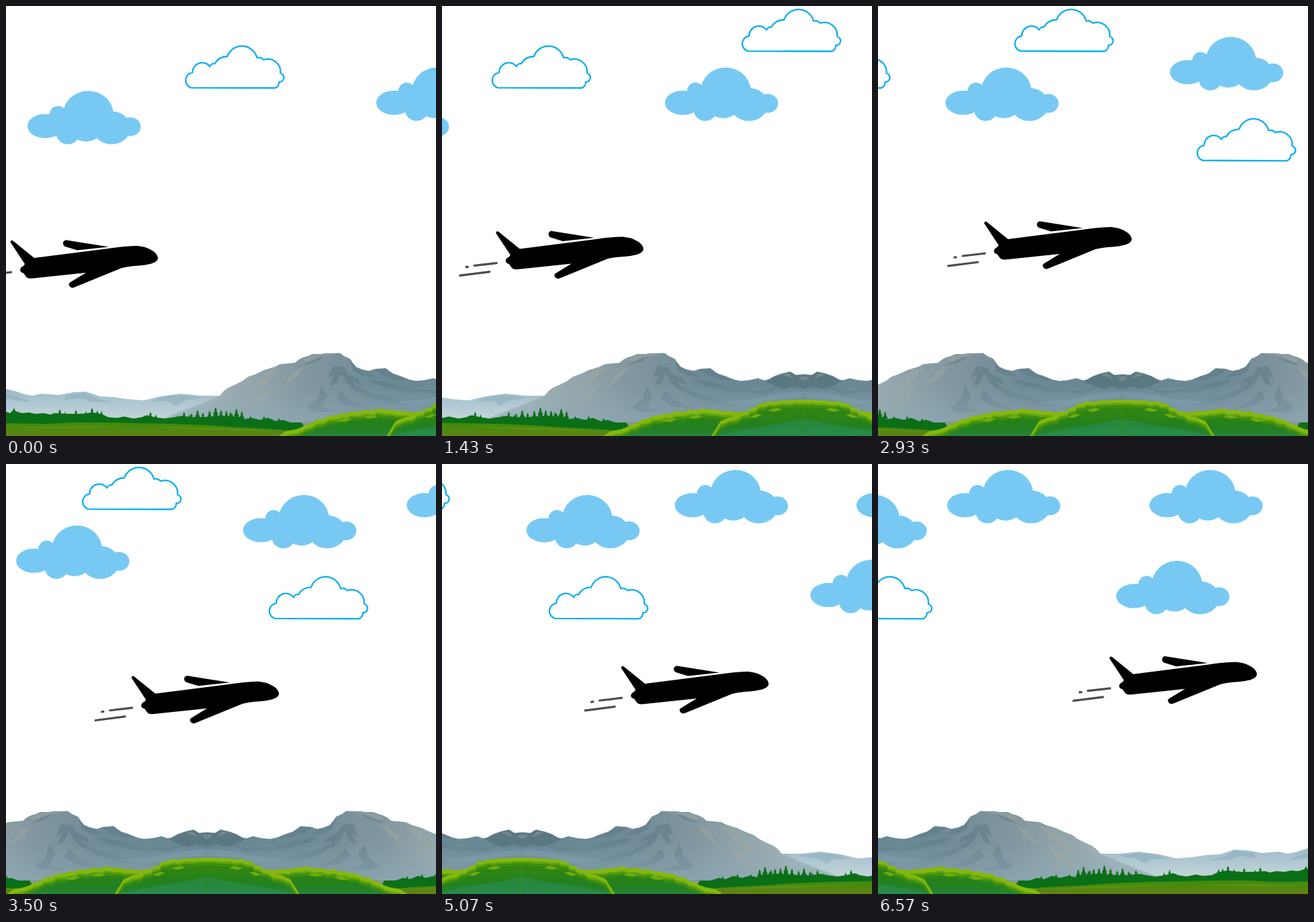
Write an HTML page without scripts that moves like this. It is 640 px wide and 640 px high and loops after 6640 ms.

```html
<!DOCTYPE html>
<html lang="en">
<head>
<meta charset="utf-8">
<title>Plane over the hills</title>
<style>
@property --k { syntax: "<integer>"; inherits: true; initial-value: 0; }
@property --u { syntax: "<integer>"; inherits: true; initial-value: 0; }

html, body { margin: 0; width: 100%; height: 100%; overflow: hidden; background: #fff; }

/* --k counts the 14 fps pictures, --u is the same moment in 25 fps units, rounded up */
body {
  --u: calc(var(--k) * 25 / 14 + .49);
  animation: clock 6640ms steps(93) -5ms infinite;
}
@keyframes clock { from { --k: 0; } to { --k: 93; } }

svg { display: block; width: 100%; height: 100%; }

/* --x, --y: start; --v, --w: speed to the left and down */
.move {
  --x: 0; --y: 0; --v: 0; --w: 0;
  transform: translate(
    calc((var(--x) - var(--u) * var(--v)) * 1px),
    calc((var(--y) + var(--u) * var(--w)) * 1px));
}
.land { --v: 4.6; }
.plane { --v: -2.048; --w: -.378; }
.rise { --w: .04; }
</style>
</head>
<body>
<svg viewBox="0 0 640 640" preserveAspectRatio="none">
  <defs>
    <linearGradient id="far" x1="0" y1="570" x2="0" y2="614" gradientUnits="userSpaceOnUse">
      <stop offset="0" stop-color="#9dbac7"/>
      <stop offset=".5" stop-color="#b0c8d2"/>
      <stop offset="1" stop-color="#c3d4d8"/>
    </linearGradient>
    <linearGradient id="rock" x1="230" y1="0" x2="704" y2="0" gradientUnits="userSpaceOnUse">
      <stop offset="0" stop-color="#b3c6cc"/>
      <stop offset=".22" stop-color="#9aacb0"/>
      <stop offset=".45" stop-color="#82979f"/>
      <stop offset=".7" stop-color="#6d8996"/>
      <stop offset="1" stop-color="#678693"/>
    </linearGradient>
    <linearGradient id="haze" x1="0" y1="560" x2="0" y2="618" gradientUnits="userSpaceOnUse">
      <stop offset="0" stop-color="#8fabb7" stop-opacity="0"/>
      <stop offset="1" stop-color="#8fabb7" stop-opacity=".6"/>
    </linearGradient>
    <linearGradient id="grass" x1="0" y1="618" x2="0" y2="640" gradientUnits="userSpaceOnUse">
      <stop offset="0" stop-color="#3f8a10"/>
      <stop offset=".5" stop-color="#4a8a0e"/>
      <stop offset="1" stop-color="#648016"/>
    </linearGradient>
    <linearGradient id="hill" x1="0" y1="592" x2="0" y2="640" gradientUnits="userSpaceOnUse">
      <stop offset="0" stop-color="#2f8412"/>
      <stop offset=".45" stop-color="#22801f"/>
      <stop offset="1" stop-color="#2b8a4c"/>
    </linearGradient>

    <g id="puff" fill="#77c9f4">
      <ellipse cx="26.5" cy="52" rx="26.5" ry="18"/>
      <circle cx="45.5" cy="34.5" r="12.5"/>
      <ellipse cx="90.5" cy="35" rx="37.5" ry="35.5"/>
      <ellipse cx="125" cy="54.5" rx="28.5" ry="24.5"/>
      <ellipse cx="153" cy="53" rx="15.5" ry="14"/>
      <ellipse cx="60" cy="62" rx="17.5" ry="17"/>
      <ellipse cx="87" cy="56" rx="23" ry="19"/>
      <path d="M30 38H130V64H30z"/>
    </g>

    <path id="line" fill="none" stroke="#0aaeef" stroke-width="2.3" stroke-linejoin="round"
      d="M11 62.6A11.6 11.6 0 0 1 13 40A14.500 14.500 0 0 1 39 31A6 6 0 0 1 46 27A22 22 0 0 1 65 16
         A23 23 0 0 1 109 18A10 10 0 0 1 119 21A19 19 0 0 1 144 41A6.6 6.6 0 0 1 142 54
         A9 9 0 0 1 136 63z"/>

    <path id="pine" d="M0 0l-2 5h1l-3 6h1.500l-6 14h17l-6-14h1.500l-3-6h1z"/>
    <g id="grove">
      <use href="#pine"/>
      <use href="#pine" x="-9" y="5"/>
      <use href="#pine" x="8" y="4"/>
    </g>

    <path id="low" d="M405 641L416 633L432 630L440 627L447 623L457 620L462 616L474 614L480 610L492 609
      L500 606L506 607L514 603L526 604L534 601L546 602L554 599L566 601L574 601L582 603L594 603L604 605L616 603L630 606L705 600V641z"/>
    <path id="high" d="M566 641L580 618L594 612L606 610L612 605L622 603L624 599L634 597L636 592L646 591
      L652 588L662 589L670 587L684 587L692 586L705 586V641z"/>

    <g id="half">
      <path fill="url(#far)" d="M0 570L13 573L28 578L40 580L52 577L78 579L100 575L118 574L128 577L140 581
        L160 582L180 585L205 587L230 581L260 577L290 580L330 580V625H0z"/>
      <g fill="#86a7b6" opacity=".45">
        <path d="M0 576l18 5 20 9-16-2-22-4zM90 580l28-4 16 8 24 6-30-1-18-6-24 4z"/>
        <path d="M215 588l28-8 22 0 30 3-28 4-16 8-8-7z"/>
      </g>

      <path fill="url(#rock)" d="M226 616L262 602L290 592L308 584L318 580L324 573L331 568L340 564L352 558
        L360 552L371 548L384 542L400 537L408 533L430 531L436 526L442 523L449 521L456 518L468 518L475 517L497 516.500
        L503 521L512 525L516 531L521 537L530 541L540 543L550 540L565 539L570 543L576 547L588 551L600 556
        L610 558L622 557L636 554L645 557L651 556L660 551L671 547L684 544L692 549L705 548V625H226z"/>
      <g fill="#5e7b88" opacity=".55">
        <path d="M487 535l16 3 6 10 16 8 4 9-12-6 6 14-17-13-7-13-8 15-9 4 6-17-9 5z"/>
        <path d="M512 526l9 12 20 8 9 7-20-3-13-7zM548 541l18-1 12 9 24 8-22-1-20-7z"/>
        <path d="M515 562l24 12 50 14 45 7-48-2-45-10-30-16z"/>
        <path d="M470 566l9 14-8 16 24 8-36 0-12-6 16-12zM498 573l15 14 30 14-34-5-18-12z"/>
        <path d="M540 555l40 8 44 14-38-4-36-10z"/>
        <path d="M458 524l16-4-10 9-22 6z"/>
      </g>
      <g fill="#9ea69f" opacity=".55">
        <path d="M392 543l16-4-18 20-22 18-14 4 20-18zM378 576l18-9-10 18-26 20-10-2 20-15z"/>
        <path d="M440 527l16-7 40-3-26 5-20 8zM425 546l20-10-14 18-20 14z"/>
      </g>
      <path fill="#59757f" opacity=".85" d="M648 559L662 551L672 548L684 545L692 550L705 549V570L690 566L676 570L662 566z"/>
      <path fill="#7d9290" opacity=".8" d="M672 549l10-2 8 9-8-4zM696 553l8-2v8z"/>
      <path fill="#7796a4" opacity=".7" d="M704 574l-34 2-50 10-45 4 40 5 50-9 39-4z"/>
      <path fill="#587681" opacity=".5" d="M704 586l-40 4-40 8 80 0zM600 570l40 2 30-4-26 10z"/>
      <path fill="url(#haze)" d="M226 618L318 582L378 562L498 562L704 572V620z"/>

      <g fill="#0b6f17">
        <path d="M0 604L6 606L11 601L17 604L24 606L34 605L44 607L56 606L66 608L74 606L90 607L112 607L130 605
          L144 608L152 612L166 613L176 611L190 614L202 612L210 609L222 612L236 614L250 612L262 610L274 612L290 612
          L320 610L346 611L354 615L366 613L378 616L390 613L402 618L412 616L424 620L440 620L450 636H0z"/>
        <use href="#pine" x="12" y="598"/>
        <use href="#grove" x="80" y="600"/>
        <use href="#grove" x="104" y="601"/>
        <use href="#grove" x="128" y="598"/>
        <use href="#pine" x="142" y="603"/>
        <use href="#grove" x="215" y="604"/>
        <use href="#grove" x="265" y="604"/>
        <use href="#grove" x="285" y="601"/>
        <use href="#grove" x="312" y="597"/>
        <use href="#grove" x="328" y="602"/>
        <use href="#grove" x="343" y="599"/>
        <use href="#pine" x="364" y="610"/>
        <use href="#pine" x="384" y="610"/>
        <use href="#pine" x="406" y="613"/>
      </g>
      <path fill="url(#grass)" d="M0 621L60 622L100 620L150 620L200 621L250 622L300 624L340 627L400 630L450 634V641H0z"/>
      <path fill="#7d9a1c" opacity=".35" d="M0 628l90-3 90 1-90 3zM200 626l120 2 90 5-110-2z"/>

      <use href="#low" fill="#84b80c"/>
      <use href="#low" y="6" fill="#5fa20f"/>
      <use href="#low" y="9" fill="#3c8d10"/>
      <use href="#low" y="13" fill="url(#hill)"/>
      <use href="#high" fill="#84b80c"/>
      <use href="#high" y="5" fill="#5fa20f"/>
      <use href="#high" y="8" fill="#3c8d10"/>
      <use href="#high" y="12" fill="url(#hill)"/>
      <path fill="#6fab12" d="M492 618l14-5 10 2-12 4zM530 612l16-3 8 3-14 2zM622 612l12-5 8 1-10 5zM650 602l14-4 8 3-12 3z"/>
      <path fill="#2c9160" opacity=".5" d="M704 614l-30 7-40 6-40 8-30 6H704z"/>
    </g>
  </defs>

  <rect width="640" height="640" fill="#fff"/>

  <g class="move land">
    <use href="#half"/>
    <use href="#half" transform="translate(1408) scale(-1 1)"/>
  </g>

  <use class="move" href="#puff" style="--x:32;--y:126.700;--v:5.28"/>
  <use class="move" href="#puff" style="--x:551;--y:92;--v:6.09"/>
  <use class="move" href="#puff" style="--x:866;--y:46.500;--v:5.83"/>
  <use class="move" href="#puff" style="--x:1160.500;--y:9.300;--v:6.41"/>
  <use class="move" href="#puff" style="--x:1328;--y:9.300;--v:5.6"/>
  <use class="move rise" href="#puff" style="--x:1196;--y:138;--v:5.1"/>

  <use class="move" href="#line" style="--x:264.500;--y:59;--v:5.35"/>
  <use class="move" href="#line" style="--x:674.500;--y:4.500;--v:6.4"/>
  <use class="move" href="#line" style="--x:912.700;--y:167.300;--v:5.95"/>

  <g class="move plane">
    <path d="M42 375L152 361Q175 357.500 193 357C209 357 226 366 226 375C226 383 210 386 190 387
      Q180 388 172 390L101 419Q97 420.500 94.500 417Q92 413 96 411L119 397L38 405.500Q31 406 28.500 401L26 397.500
      Q21 396.500 21 392.500Q22 388 26 387L28 384L6.500 351.500Q7 347.500 10.500 349.500z"/>
    <path d="M90 348.500L153 358.500L106 363.500L88 358Q84.500 356 85 352Q86.500 348 90 348.500z"/>
    <g fill="none" stroke="#4d4d4f" stroke-width="3.2">
      <path stroke-linecap="round" d="M-25.500 400L7.500 396.200M-47 414.800L-3 409.200"/>
      <path d="M-39 402.300l5-.6"/>
    </g>
  </g>
</svg>
</body>
</html>
```
